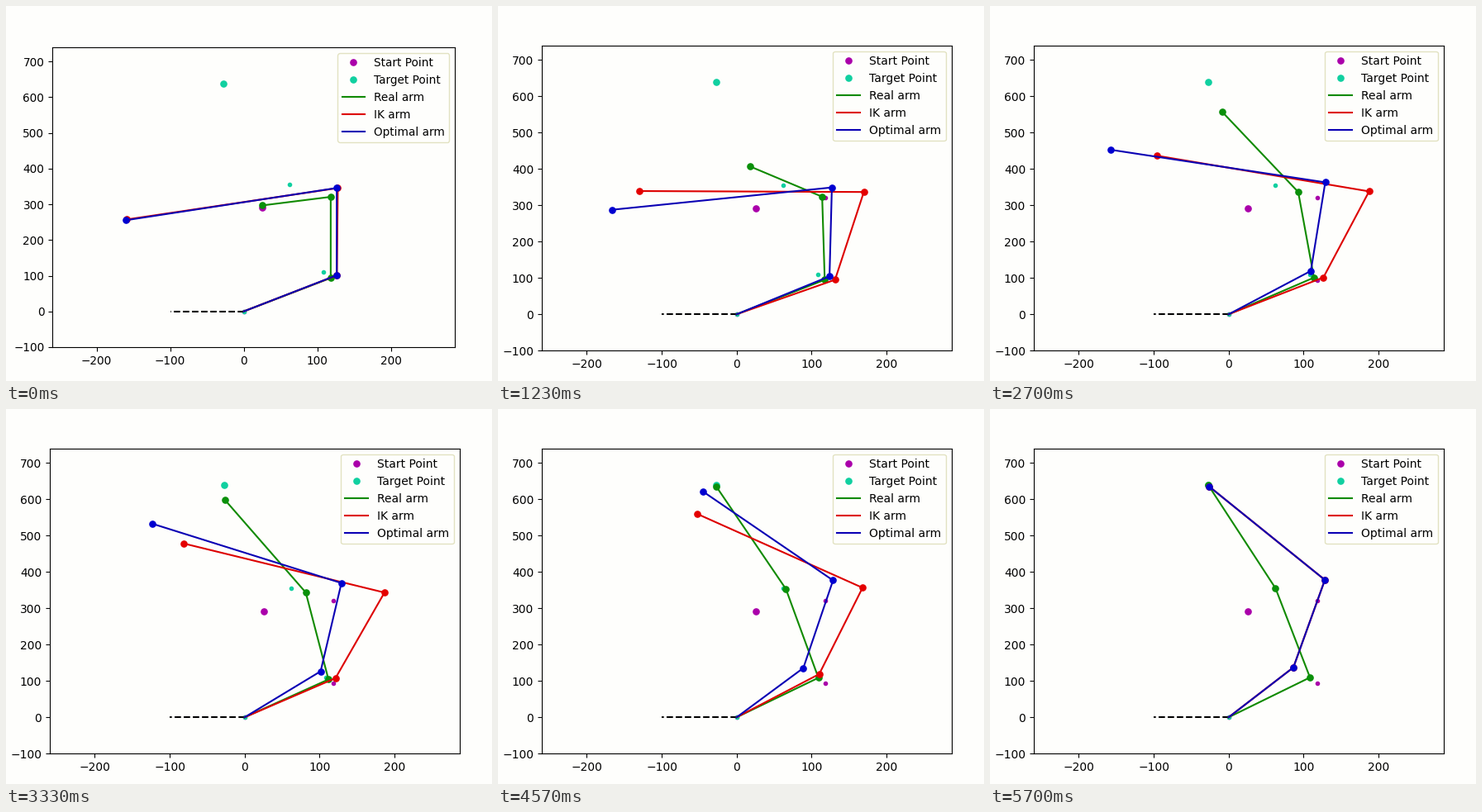
A matplotlib script for the animation above (5.73 s loop, 588 by 454 pixels).

```python
import numpy as np
import matplotlib.pyplot as plt
from matplotlib.animation import FuncAnimation

W, H, DPI = 588, 454, 100
LOOP, STEP = 5730, 30
BG = "#fefefc"
GREEN, RED, BLUE = "#108a00", "#dd0000", "#0a00b4"
PURPLE, TEAL = "#aa00aa", "#10d0a0"

# Arm geometry: link lengths and absolute link angles in degrees
LINKS = np.array([162, 244.5, 300])
POSE_A = np.array([38.7, 90.0, 197.5])
POSE_B = np.array([57.8, 80.1, 121.0])

# Elbow, wrist and tip of the real arm at both ends of its move
START = np.array([(118.2, 93.6), (118.2, 320.9), (25.6, 291.4)])
TARGET = np.array([(108.5, 109.5), (62.5, 355.0), (-27.3, 639.0)])


def unit(deg):
    a = np.radians(deg)
    return np.array([np.cos(a), np.sin(a)])


def forward(pose):
    steps = [length * unit(a) for length, a in zip(LINKS, pose)]
    return np.vstack([[0, 0], np.cumsum(steps, axis=0)])


TIP_A, TIP_B = forward(POSE_A)[-1], forward(POSE_B)[-1]


def mix(a, b, s):
    return a + (b - a) * s


def min_jerk(u):
    return u ** 3 * (10 - 15 * u + 6 * u * u)


def real_arm(u):
    """Joints ease evenly, while the tip rises early and then settles."""
    s = min_jerk(u)
    v = 1 - 0.933 * (1 - u) ** 1.68
    ease = np.array([(s, s), (s, s), (min(u / 0.59, 1) ** 2, v * v * (3 - 2 * v))])
    return np.vstack([[0, 0], mix(START, TARGET, ease)])


def ik_arm(u):
    """Tip on a straight line at constant speed, elbow from the cosine rule."""
    tip = mix(TIP_A, TIP_B, u)
    a3 = mix(POSE_A[2], POSE_B[2], u) - 1.2 * np.sin(2 * np.pi * u)
    wrist = tip - LINKS[2] * unit(a3)
    r = np.hypot(*wrist)
    c = (LINKS[0] ** 2 + r ** 2 - LINKS[1] ** 2) / (2 * LINKS[0] * r)
    a1 = np.degrees(np.arctan2(wrist[1], wrist[0]) - np.arccos(min(c, 1)))
    return np.vstack([[0, 0], LINKS[0] * unit(a1), wrist, tip])


def optimal_arm(u):
    """Minimum-jerk blend of the joint angles."""
    return forward(mix(POSE_A, POSE_B, min_jerk(u)))


fig = plt.figure(figsize=(W / DPI, H / DPI), dpi=DPI, facecolor=BG)
ax = fig.add_axes([0.1, 0.1, 0.8, 0.8], facecolor=BG)
ax.set_xlim(-260, 287)
ax.set_ylim(-100, 740)
ax.set_xticks(range(-200, 201, 100))
ax.set_yticks(range(-100, 701, 100))


def add_points(joints, color, label):
    ax.plot(*joints[2], "o", color=color, ms=5.2, label=label)
    ax.plot(*np.vstack([[0, 0], joints[:2]]).T, "o", color=color, ms=3)


def add_arm(pose, color, joint_color, label):
    line, = ax.plot([], [], color=color, label=label)
    dots, = ax.plot([], [], "o", color=joint_color, ms=5.2)
    return pose, line, dots


add_points(START, PURPLE, "Start Point")
add_points(TARGET, TEAL, "Target Point")
ax.plot([0, -100], [0, 0], "k--")
arms = [add_arm(real_arm, GREEN, "#0a900a", "Real arm"),
        add_arm(ik_arm, RED, "#e40000", "IK arm"),
        add_arm(optimal_arm, BLUE, "#0000d0", "Optimal arm")]
zoom = None


def layout(z):
    """Scale the whole chart, as a window does while it opens."""
    global zoom
    if z == zoom:
        return
    zoom = z
    left, top = mix(225, 53, z), mix(180, 47.6, z)
    w, h = 496 * z, 369.6 * z
    ax.set_position([left / W, 1 - (top + h) / H, w / W, h / H])
    ax.tick_params(labelsize=10 * z)
    ax.legend(loc="upper right", fontsize=10 * z, facecolor=BG,
              edgecolor="#dcdcb4")


def draw(i):
    t = i * STEP
    layout(1 - 0.018 * max(0, 1 - t / 120) ** 2)
    u = (t + STEP) / LOOP
    for pose, line, dots in arms:
        p = pose(u)
        line.set_data(*p.T)
        dots.set_data(*p[1:].T)
    return []


anim = FuncAnimation(fig, draw, frames=LOOP // STEP, interval=STEP,
                     repeat=True, repeat_delay=0)
plt.show()
```
